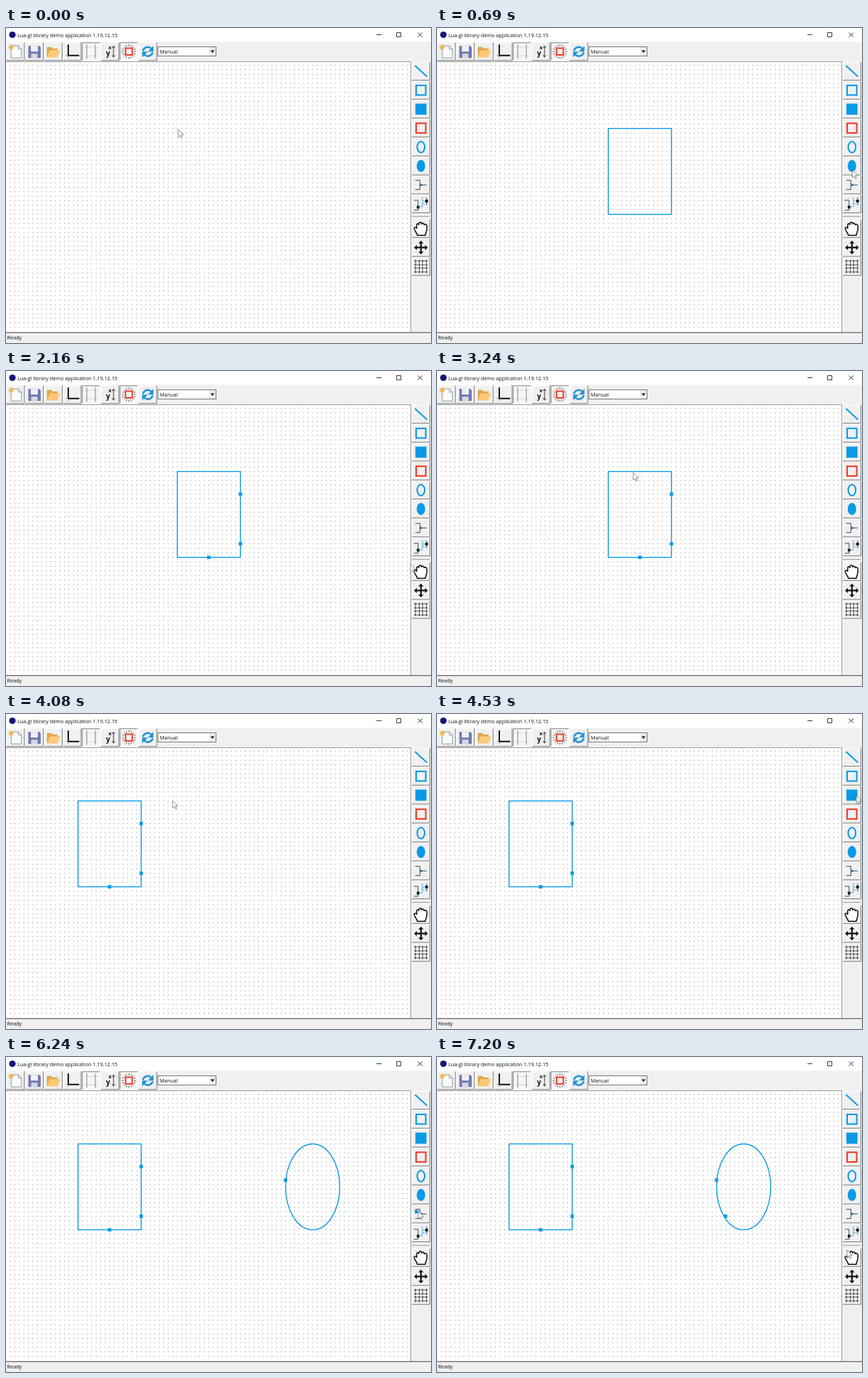
Recreate the animation shown at these times as an HTML page. Size 600 by 444 pixels, loop 7.26 s.

```html
<!DOCTYPE html>
<html lang="en">
<head>
<meta charset="utf-8">
<title>Diagram editor demo</title>
<style>
html, body { margin: 0; width: 100%; height: 100%; overflow: hidden; background: #f0f0f0; }
svg { display: block; width: 600px; height: 444px; }
text { font: 7.25px "Open Sans", "Noto Sans", sans-serif; fill: #111; }
</style>
</head>
<body>
<svg id="stage" viewBox="0 0 600 444" xmlns="http://www.w3.org/2000/svg"></svg>
<script>
const LOOP = 7260, TICK = 30;
const CELL = 6.37, GRID_X = 6.13, GRID_Y = 52.45;
const PITCH = 26.7, SIDE_X = 585.8;
const BLUE = '#0a9ae6', RED = '#f03a28';
const stage = document.getElementById('stage');

// Drawing helpers
const outline = (color, width) => `fill="none" stroke="${color}" stroke-width="${width}"`;
const stroke = (d, color = '#111', width = 1, extra = '') => `<path d="${d}" ${outline(color, width)} ${extra}/>`;
const fill = (d, color = '#111') => `<path d="${d}" fill="${color}"/>`;
const rect = (x, y, w, h, paint) => `<rect x="${x}" y="${y}" width="${w}" height="${h}" ${paint}/>`;
const box = (x, y, w, h, color) => rect(x, y, w, h, `fill="${color}"`);
const square = (size, paint, x = 0, y = 0) => rect(x - size / 2, y - size / 2, size, size, paint);
const oval = (rx, ry, paint, x = 0, y = 0) => `<ellipse cx="${x}" cy="${y}" rx="${rx}" ry="${ry}" ${paint}/>`;
const at = (x, y, content) => `<g transform="translate(${x} ${y})">${content}</g>`;
const spin = (count, part) => Array.from({ length: count },
  (_, i) => `<g transform="rotate(${i * 360 / count})">${part}</g>`).join('');
const solid = color => `fill="${color}"`;

const page = 'M-6-8H4L8.5-3.5V9H-6Z';
const icons = {
  create: fill(page, '#fafbfc') + stroke(page + 'M4-8V-3.5H8.5', '#8b8f95', .9) +
    at(-6, -6, spin(8, stroke('M0 0H4', '#f3ad3c', 1.2))),
  save: fill('M-8.5-8H7L9-6V9H-8.5Z', '#7378ad') + box(-5, -8, 10, 8, '#eef0f7') + box(-4.5, 3, 9, 6, '#d6d8e6'),
  open: fill('M-9-6.5H-3L-1-4.5H6V8H-9Z', '#e0a64c') + fill('M-9 8L-5-2H10L6 8Z', '#fbc877'),
  axes: stroke('M-5.5-10V5.5H10', '#111', 2) + stroke('M-9 5.5H-5.5V9', '#777', .8),
  grid: spin(2, stroke('M-6-10V10M6-10V10', '#a4a4a4', .8)) + spin(4, stroke('M-6-10V10', '#a4a4a4', .4)),
  scale: '<text x="-5.5" y="5.5" style="font-size:10px;font-weight:700">y</text>' +
    '<text x="-2" y="-3.5" style="font-size:7px;font-weight:700">x</text>' +
    stroke('M5-7V7M3-5L5-8L7-5M3 5L5 8L7 5', '#222', .9),
  snap: spin(16, stroke('M7.5 0H10', '#333', .8)) + square(9.5, outline(RED, 2)),
  refresh: spin(2, stroke('M-7-1C-5-7 2-8 5-4', '#2494d8', 2.7) + fill('M8-8V0H0Z', '#2494d8')),
  line: stroke('M-8.5-8L8.5 7.5', BLUE, 2),
  rect: square(13.6, outline(BLUE, 2.1)),
  filledRect: square(15.7, solid(BLUE)),
  blockRect: square(13.6, outline(RED, 2.1)),
  ellipse: oval(5.3, 7.8, outline(BLUE, 2)),
  filledEllipse: oval(6, 8.5, solid(BLUE)),
  port: stroke('M-8-6.5H-1.5V6.5H-8M-1.5 0H8', '#333', .9) + square(3, solid('#1673a8')),
  connector: stroke('M-10-5H-4V9H-10M8-9V2', '#333', .9) + square(3.8, solid('#111'), -4, 4.5) +
    stroke('M-4 4H2V-4H8M2 0H6M2-9V-4', BLUE, .9, 'stroke-dasharray="2 .8"') + square(3.8, solid('#111'), 8, -4),
  hand: `<path d="M-5 9.5C-6 5-10 3-9.5-1C-8.5-3-6.5-1-6 0V-5C-5.5-8-3-7-3-5C-3-10 1-10 1-6
    C1.5-9 4.5-8 4.5-5C5.5-7 8.8-6 8.5-3C9 3 7 5 6 9.5Z" fill="#fff" stroke="#111" stroke-width="1.5"/>`,
  move: spin(4, stroke('M0 0V-7', '#111', 2.2) + fill('M-3.7-5.8L0-9.7L3.7-5.8Z')),
  group: spin(4, at(-5, -5, square(5.6, outline('#555', .9)) + spin(4, oval(1.3, 1.3, solid('#555'), -3, -3))))
};

function button(name, x, y, sunken) {
  const [light, dark] = sunken ? ['#777', '#fff'] : ['#fff', '#707070'];
  return at(x, y, square(25.6, solid(sunken ? '#f6f6f6' : '#f0f0f0')) +
    stroke('M-12.4 12.8V-12.4H12.8', light, .9) + stroke('M-12.8 12.6H12.6V-12.8', dark, .9) + icons[name]);
}

const topTools = ['create', 'save', 'open', 'axes', 'grid', 'scale', 'snap', 'refresh'];
const sideTools = ['line', 'rect', 'filledRect', 'blockRect', 'ellipse', 'filledEllipse', 'port', 'connector'];
const lowTools = ['hand', 'move', 'group'];
const sideY = {};
sideTools.forEach((name, i) => sideY[name] = 61 + i * PITCH);
lowTools.forEach((name, i) => sideY[name] = 282.7 + i * PITCH);

function gridDots() {
  let d = '';
  for (let y = GRID_Y; y < 428; y += CELL) d += `M${GRID_X - .4} ${y.toFixed(2)}H570`;
  return stroke(d, '#333', .8, `stroke-dasharray=".8 ${CELL - .8}"`);
}

stage.innerHTML =
  box(0, 0, 600, 444, '#f0f0f0') + box(0, 0, 600, 19.5, '#fff') +
  oval(4.6, 4.6, solid('#15157c'), 9, 9.5) +
  '<text x="16" y="12.6">Lua-gl library demo application 1.19.12.15</text>' +
  stroke('M523 9.5H530M551.5 6.5H557.5V12.5H551.5ZM581.5 6.5L588 12.5M588 6.5L581.5 12.5', '#222', .9) +
  topTools.map((name, i) => button(name, 13.3 + i * PITCH, 33.2, name === 'grid' || name === 'snap')).join('') +
  box(214.5, 26.5, 82, 13, '#fff') + rect(214.5, 26.5, 82, 13, outline('#777', 1)) +
  box(286.5, 27, 9.5, 12, '#ececec') + fill('M288.7 31.5H294.3L291.5 35Z') +
  '<text x="217" y="35.8">Manual</text>' +
  box(0, 47.5, 571.5, 381, '#fff') + gridDots() +
  stroke('M0 47.5H571.5V429', '#909090', .9) + stroke('M0 429.3H600', '#666', 1.3) +
  Object.keys(sideY).map(name => button(name, SIDE_X, sideY[name])).join('') +
  stroke('M573 265.5H598', '#a0a0a0') +
  '<text x="1.6" y="439">Ready</text>' +
  '<g id="pressed"></g><g id="drawing"></g>' +
  '<path id="cursor" d="M0 0V10.7L2.5 8.4L4.1 12L5.8 11.3L4.2 7.7H7.6Z" fill="#fff" stroke="#555" stroke-width=".65"/>';
const [pressedLayer, drawing, cursor] = ['pressed', 'drawing', 'cursor'].map(id => document.getElementById(id));

// The session is a sequence of pointer stops, tool presses and port placements.
const stops = [], presses = [], ports = [];
const cell = (col, row) => [GRID_X + col * CELL, GRID_Y + row * CELL];

function go(time, [x, y], hold = 0) {
  stops.push({ time, x, y });
  if (hold) stops.push({ time: time + hold, x, y });
}
function press(time, name) {
  go(time, [SIDE_X, sideY[name] - 4], 75);
  presses.push({ time, name });
}
function placePort(from, to, col, row, onRect) {
  press(from, 'port');
  go(to, cell(col, row), 40);
  ports.push({ from: from + 75, to, onRect });
}

const RECT = { from: 60, to: 330 }, DRAG = { from: 3300, to: 3780 }, ELLIPSE = { from: 4890, to: 5070 };

go(0, [243, 143]);
go(RECT.from, cell(37, 14));
go(RECT.to, cell(51, 33), 60);
go(600, [590, 107]);
placePort(720, 960, 51, 19, true);
placePort(1140, 1320, 51, 30, true);
go(1470, [535, 183]);
placePort(1560, 1860, 44, 33, true);
go(2160, [571, 272]);
press(2310, 'move');
go(2940, [277, 143], DRAG.from - 2940);
go(DRAG.to, [277 - 22 * CELL, 143 - 3 * CELL], 120);
go(4500, [592, 115], 60);
press(4650, 'ellipse');
go(ELLIPSE.from, cell(61, 11));
go(ELLIPSE.to, cell(73, 30), 30);
go(5190, [530, 332]);
placePort(5340, 5790, 61, 19);
placePort(6120, 6720, 63, 27);
go(6900, cell(63, 27));
go(7080, [587, 169]);
go(7200, [579, 272], LOOP - 7200);

function pointer(t) {
  const i = stops.findIndex(stop => stop.time > t);
  const a = stops[i - 1], b = stops[i];
  const u = (t - a.time) / (b.time - a.time), ease = u * u * (3 - 2 * u);
  return [a.x + (b.x - a.x) * ease, a.y + (b.y - a.y) * ease];
}
function snapped(t) {
  const [x, y] = pointer(t);
  return cell(Math.round((x - GRID_X) / CELL), Math.round((y - GRID_Y) / CELL));
}
// Snapped start and current end of a drag
const span = (t, { from, to }) => [...snapped(from), ...snapped(Math.max(from, Math.min(t, to)))];

function render(t) {
  cursor.setAttribute('transform', `translate(${pointer(t)})`);
  const active = presses.find(p => t >= p.time && t < p.time + 75);
  pressedLayer.innerHTML = active ? button(active.name, SIDE_X, sideY[active.name], true) : '';

  const line = outline(BLUE, 1.4);
  let onRect = '', free = '';
  if (t >= RECT.from) {
    const [ax, ay, bx, by] = span(t, RECT);
    onRect += rect(ax, ay, bx - ax, by - ay, line);
  }
  if (t >= ELLIPSE.from) {
    const [ax, ay, bx, by] = span(t, ELLIPSE);
    free += oval((bx - ax) / 2, (by - ay) / 2, line, (ax + bx) / 2, (ay + by) / 2);
  }
  for (const port of ports.filter(p => t >= p.from)) {
    const [, , x, y] = span(t, port);
    const mark = square(4.8, solid(BLUE), x, y);
    if (port.onRect) onRect += mark;
    else free += mark;
  }
  const [ax, ay, bx, by] = span(t, DRAG);
  drawing.innerHTML = at(bx - ax, by - ay, onRect) + free;
}

const start = performance.now();
function frame() {
  const t = (performance.now() - start) % LOOP;
  render(Math.floor(t / TICK) * TICK);
  requestAnimationFrame(frame);
}
frame();
</script>
</body>
</html>
```
